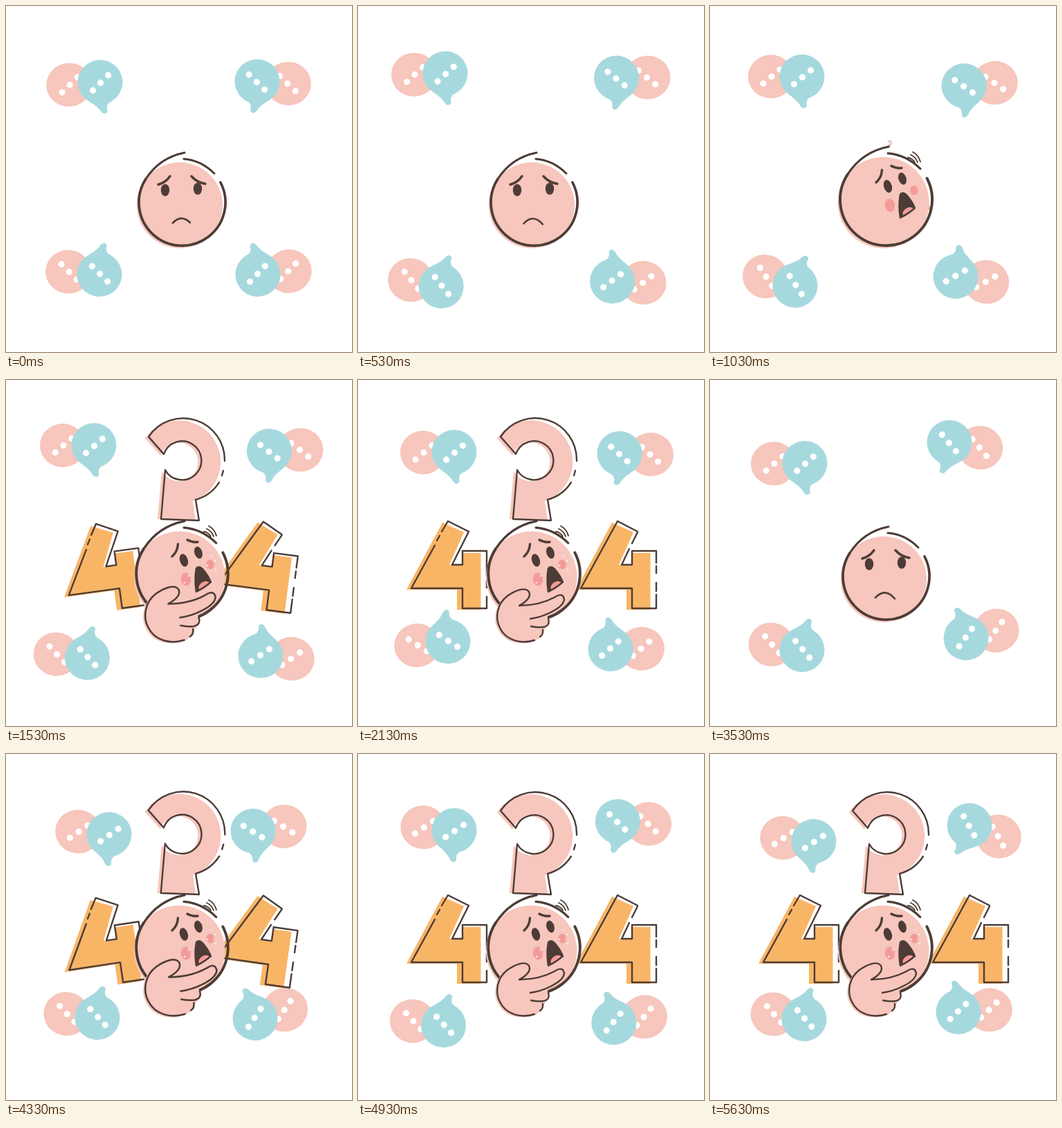
An HTML page for the animation above (5.71 s loop, 500 by 500 pixels).

```html
<!DOCTYPE html>
<html lang="en">
<head>
<meta charset="utf-8">
<title>404</title>
<style>
  html, body { margin: 0; width: 100%; height: 100%; overflow: hidden; background: #fff; }
  svg { display: block; width: 100%; height: 100%; }
  .pink { fill: #f7c6bc; }
  .teal { fill: #a6d9de; }
  .orange { fill: #f9b566; }
  .blush { fill: #f49b9a; }
  .dark { fill: #4d3c36; }
  .white { fill: #fff; }
  .ink { fill: none; stroke: #4d3c36; stroke-width: 2.4; stroke-linecap: round; stroke-linejoin: round; }
  .dots { fill: none; stroke: #fff; stroke-width: 9.2; stroke-linecap: round; }
</style>
</head>
<body>
<svg viewBox="0 0 500 500">
  <defs>
    <g id="bubbles">
      <ellipse class="pink" cx="-45" rx="33" ry="31.5"/>
      <path class="dots" d="M-56 10h0M-44 0h0M-32 -10h0"/>
      <ellipse class="teal" rx="32.5" ry="32"/>
      <path class="teal" d="M-30 13C-22 27 -8 31 -2 43Q3 49 7 43Q5 35 10 31Q20 27 26 19Z"/>
      <path class="dots" d="M-11.5 11h0M.5 1h0M12.5 -9h0"/>
    </g>
    <path id="four" class="orange" d="M122 206L153 220L132 267H150V250H177.5V332H143V303H70Z"/>
    <path id="mouth" d="M275 272Q279 268 284 273Q292 282 296 292Q287 300 275 306Q272 288 275 272Z"/>
    <clipPath id="mouthClip"><use href="#mouth"/></clipPath>
  </defs>

  <g id="talk"></g>

  <g id="left">
    <use href="#four"/>
    <path class="ink" d="M121 219L130 204L160 219L136 267H151V247H186V284M186 289V300M186 313V330H151V301H77L111 239M114 232L118 225"/>
  </g>
  <g id="right">
    <use href="#four" x="245"/>
    <path class="ink" d="M404 220L396 236M392 244L381 267H396V247H431V264M431 269V279M431 293V305M431 310V330H396V301H322L375 204L404 219"/>
  </g>

  <g id="ask">
    <path class="pink" transform="translate(-5 2)" d="M206 82A60 60 0 1 1 275 173L279 200L224 199L230 130A28 28 0 1 0 228 107Z"/>
    <path class="ink" d="M316 117A60 60 0 0 0 206 82L228 107A28 28 0 1 1 230 130L224 201L279 203L274 173A60 60 0 0 0 308 148M312 138L314 131"/>
  </g>

  <g id="head">
    <circle class="pink" cx="251" cy="288" r="62"/>
    <path class="ink" style="stroke-width:3.7" d="M310 255A62.5 62.5 0 1 1 202 250"/>
    <path class="ink" style="stroke-width:3" d="M202 250Q222 219 258 212M257 221Q282 223 301 242"/>
  </g>

  <g id="sad">
    <ellipse class="dark" cx="230" cy="266" rx="6.2" ry="8.8"/>
    <ellipse class="dark" cx="277" cy="264" rx="6.2" ry="8.8"/>
    <path class="ink" style="stroke-width:3.4" d="M220 258Q231 255 237 246M268 246Q276 255 288 257"/>
    <path class="ink" id="frown" style="stroke-width:2.6"/>
  </g>

  <g id="shock">
    <ellipse class="dark" cx="257" cy="260.5" rx="5.8" ry="9.5" transform="rotate(-18 257 260.5)"/>
    <ellipse class="dark" cx="278" cy="249.5" rx="5.6" ry="9" transform="rotate(-18 278 249.5)"/>
    <path class="ink" style="stroke-width:3.4" d="M240 255Q248 248 248.5 237M262 231Q269 235 277 234"/>
    <ellipse class="blush" cx="260" cy="288" rx="7.2" ry="9.5" transform="rotate(-8 260 288)"/>
    <ellipse class="blush" cx="295" cy="266.5" rx="5.6" ry="7"/>
    <use href="#mouth" class="dark"/>
    <ellipse class="blush" cx="287" cy="298" rx="9" ry="6.5" transform="rotate(-28 287 298)" clip-path="none"/>
    <use href="#mouth" class="ink"/>
    <path class="ink" style="stroke-width:1.9" d="M293 211Q301 215 304 225M290 215Q297 218 300 226M286 219Q292 220 296 226"/>
    <path id="shine" class="dots" style="stroke-width:2.6" opacity=".75" d="M297 254h0M302 261h0M291 268h0M303 274h0M264 283h0M258 293h0"/>
  </g>

  <g id="hand">
    <path class="pink" transform="translate(-3 2)" d="M234 326C242 321 251 314 247 306C241 298 226 305 216 312C200 324 198 345 205 358C214 377 236 382 255 376Q268 373 269 362Q276 357 277 350L277 337Q297 327 299 317Q296 306 284 314Q262 326 234 326Z"/>
    <path class="ink" d="M233 326C242 321 251 314 247 306C241 298 226 305 216 312C200 324 198 345 205 358C214 377 236 382 255 376M233 326Q262 326 284 314Q296 306 298 317Q297 327 278 336Q264 343 249 345M275 345Q278 355 268 357Q259 358 250 356M267 361Q268 368 263 371"/>
  </g>
</svg>
<script>
const LOOP = 5710, CYCLE = 57;
const $ = id => document.getElementById(id);

// Tongue stays inside the mouth
document.querySelector('#shock [clip-path]').outerHTML =
  '<g clip-path="url(#mouthClip)"><ellipse class="blush" cx="287" cy="298" rx="9" ry="6.5" transform="rotate(-28 287 298)"/></g>';

// Key poses "x y tilt" of the drifting pairs at shared steps
const stops = [0, 21, 43, 60, 71, 87, 113];
const pairs = [
  [1, 1, '136 110 -5, 133 102 0, 139 104 -1, 138 96 -10, 137 120 -1, 149 116 5, 150 126 6'],
  [-1, 1, '363 109 4, 367 115 -5, 378 106 2, 367 118 -5, 346 90 10, 357 111 -8, 375 103 21'],
  [1, -1, '135 388 5, 123 404 17, 130 378 -7, 146 370 2, 133 390 10, 132 381 7, 136 383 9'],
  [-1, -1, '364 388 -6, 355 391 10, 365 389 -1, 349 381 -1, 370 373 -14, 360 382 -16, 359 373 -4']
].map(([sx, sy, text]) => {
  const el = document.createElementNS('http://www.w3.org/2000/svg', 'use');
  el.setAttribute('href', '#bubbles');
  $('talk').append(el);
  return { el, sx, sy, poses: text.split(',').map(p => p.trim().split(' ').map(Number)) };
});

// Ease from pose to pose, swinging outwards in between
function drift({ el, sx, sy, poses }, k) {
  const i = Math.max(0, stops.findIndex(s => s >= k) - 1);
  const span = stops[i + 1] - stops[i], u = (k - stops[i]) / span;
  const ease = u * u * (3 - 2 * u), swing = .4 * span * Math.sin(Math.PI * u) ** 2;
  const [x, y, r] = poses[i].map((v, j) => v + (poses[i + 1][j] - v) * ease);
  el.setAttribute('transform',
    `translate(${x - sx * swing} ${y - sy * swing}) rotate(${r}) scale(${sx} ${sy})`);
}

// Damped spring from 0 to 1
const spring = d => d <= 0 ? 0 : 1 - Math.exp(-.466 * d) * Math.cos(.476 * d);
const clamp = u => Math.min(Math.max(u, 0), 1);
const show = (id, on) => $(id).setAttribute('visibility', on ? 'visible' : 'hidden');
const place = (id, px, py, s, r = 0, dx = 0, dy = 0) => $(id).setAttribute('transform',
  `translate(${px + dx} ${py + dy}) rotate(${r}) scale(${s}) translate(${-px} ${-py})`);

function draw(k) {
  for (const p of pairs) drift(p, k);

  const c = k % CYCLE, shocked = c >= 18, grown = spring(c - 20.87);
  place('head', 255, 348, 1 + .06 * spring(c - 16));
  show('sad', !shocked);
  show('shock', shocked);
  show('shine', c >= 25);

  const g = clamp(c / 14);
  $('frown').setAttribute('d',
    `M${241 - 2 * g} ${313.5 + g}Q${253.5 - .5 * g} ${300.5 - g} ${266 + g} ${313 + 3 * g}`);

  place('ask', 260, 203, grown);
  place('hand', 200, 380, spring(c - 24.5));
  const swing = Math.sin(Math.PI * clamp((c - 21) / 15));
  place('left', 197, 292, grown, -9 * swing, 13 * swing, -7 * swing);
  place('right', 311, 292, grown, 8.5 * swing, -16 * swing, -9.5 * swing);
}

// Two pictures per 100 ms, held for 30 and 70 ms
const stepAt = t => Math.min(2 * Math.floor(t / 100) + (t % 100 >= 30 ? 1 : 0), 2 * CYCLE - 1);
const start = performance.now();
function tick() {
  draw(stepAt((performance.now() - start) % LOOP));
  requestAnimationFrame(tick);
}
tick();
</script>
</body>
</html>
```
